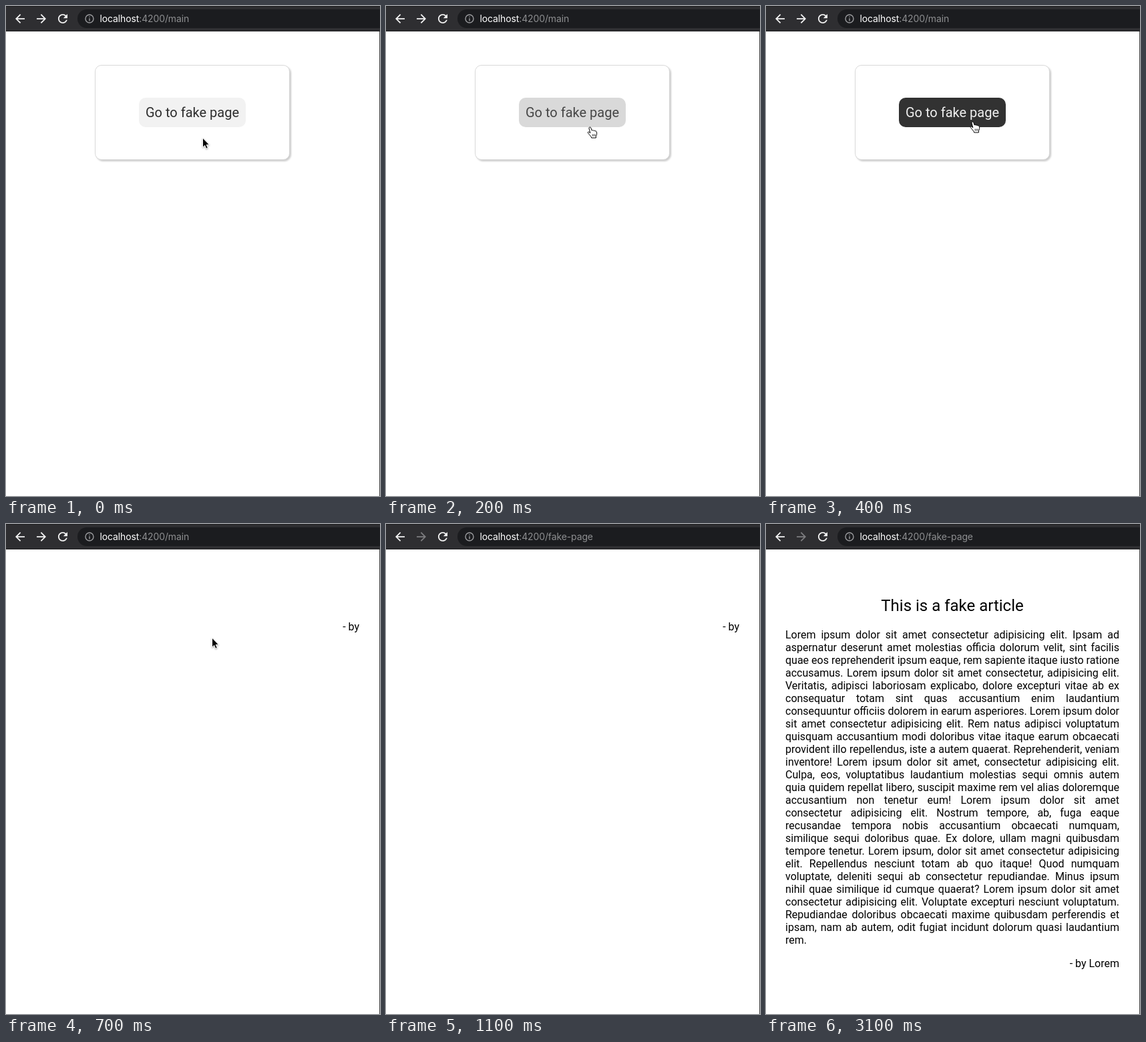
These frames come from a looping animation (560x732 px, 3400 ms). An HTML page:

```html
<!DOCTYPE html>
<html lang="en">
<head>
<meta charset="utf-8">
<title>Fake page</title>
<style>
  html, body { margin: 0; width: 100%; height: 100%; overflow: hidden; background: #fff; }
  body { position: relative; font: 16px/19px Roboto, sans-serif; color: #000; }
  svg { position: absolute; left: 0; top: 0; }
  article, #byline { position: absolute; left: 29px; width: 500px; }
  article { top: 108px; }
  h1 { margin: 0 0 20px; font-size: 24px; font-weight: 400; line-height: 28px; text-align: center; }
  p { margin: 0; white-space: pre-line; text-align: justify; text-align-last: justify; }
  #byline { text-align: right; }
  .url { font: 14px Inter, sans-serif; letter-spacing: -.12px; }
</style>
</head>
<body>
<article id="article"><h1>This is a fake article</h1><p>Lorem ipsum dolor sit amet consectetur adipisicing elit. Ipsam ad
aspernatur deserunt amet molestias officia dolorum velit, sint facilis
quae eos reprehenderit ipsum eaque, rem sapiente itaque iusto ratione
accusamus. Lorem ipsum dolor sit amet consectetur, adipisicing elit.
Veritatis, adipisci laboriosam explicabo, dolore excepturi vitae ab ex
consequatur totam sint quas accusantium enim laudantium
consequuntur officiis dolorem in earum asperiores. Lorem ipsum dolor
sit amet consectetur adipisicing elit. Rem natus adipisci voluptatum
quisquam accusantium modi doloribus vitae itaque earum obcaecati
provident illo repellendus, iste a autem quaerat. Reprehenderit, veniam
inventore! Lorem ipsum dolor sit amet, consectetur adipisicing elit.
Culpa, eos, voluptatibus laudantium molestias sequi omnis autem
quia quidem repellat libero, suscipit maxime rem vel alias doloremque
accusantium non tenetur eum! Lorem ipsum dolor sit amet
consectetur adipisicing elit. Nostrum tempore, ab, fuga eaque
recusandae tempora nobis accusantium obcaecati numquam,
similique sequi doloribus quae. Ex dolore, ullam magni quibusdam
tempore tenetur. Lorem ipsum, dolor sit amet consectetur adipisicing
elit. Repellendus nesciunt totam ab quo itaque! Quod numquam
voluptate, deleniti sequi ab consectetur repudiandae. Minus ipsum
nihil quae similique id cumque quaerat? Lorem ipsum dolor sit amet
consectetur adipisicing elit. Voluptate excepturi nesciunt voluptatum.
Repudiandae doloribus obcaecati maxime quibusdam perferendis et
ipsam, nam ab autem, odit fugiat incidunt dolorum quasi laudantium
rem.</p></article>
<div id="byline"></div>

<svg width="560" height="732" viewBox="0 0 560 732">
  <defs>
    <path id="back" d="M20 11H7.83l5.59-5.59L12 4l-8 8 8 8 1.41-1.41L7.83 13H20v-2z"/>
  </defs>

  <!-- browser toolbar -->
  <rect width="560" height="38" fill="#2e2e31"/>
  <path d="M0 .5H560M0 37.5H560" stroke="#1d1d1f"/>
  <path d="M559.5 38V732" stroke="#444"/>
  <rect x="107" y="5" width="480" height="28" rx="14" fill="#1b1c1f"/>
  <g fill="#f5f5f5">
    <use href="#back" transform="translate(21 19) scale(.875) translate(-12 -12)"/>
    <use id="forward" href="#back" transform="translate(53 19) scale(-.875 .875) translate(-12 -12)"/>
    <path transform="translate(85 19) scale(.875) translate(-12 -12)" d="M17.65 6.35C16.2 4.9 14.21 4 12 4c-4.42 0-8 3.58-8 8s3.58 8 8 8c3.73 0 6.84-2.55 7.73-6h-2.08c-.82 2.33-3.04 4-5.65 4-3.31 0-6-2.69-6-6s2.69-6 6-6c1.66 0 3.14.69 4.22 1.78L13 11h7V4z"/>
  </g>
  <g fill="none" stroke="#9a9b9e" stroke-width="1.4">
    <circle cx="125" cy="19" r="6"/>
    <path d="M125 15.4v1.4M125 18.2v4.2"/>
  </g>
  <text class="url" x="140.5" y="24" fill="#fff">localhost<tspan fill="#8d8e90">:4200/<tspan id="route"></tspan></tspan></text>

  <!-- main page -->
  <g id="card">
    <rect x="133.5" y="88.5" width="291" height="141" rx="9.5" fill="#fff" stroke="#d8d8d8" style="filter:drop-shadow(2px 2px 1px #0003)"/>
    <rect id="button" x="199" y="137" width="160" height="44" rx="10"/>
    <text id="label" x="279" y="166" font-size="20" text-anchor="middle">Go to fake page</text>
  </g>

  <!-- cursors -->
  <g fill="#000" stroke="#fff" style="filter:drop-shadow(0 1px 1px #0005)">
    <path id="arrow" d="M0 0V14.2L3.2 11.2L5.3 16.2L7.8 15.1L5.7 10.3H10Z"/>
  </g>
  <g id="hand" fill="#fff" stroke="#000" stroke-linejoin="round">
    <path d="M3.6 1.2C4.6 .6 5.4 1 5.8 2L7.2 6C7.6 5.2 9.2 5.2 9.6 6.3C10.2 5.6 11.7 5.8 12 7C13 6.4 14.2 7 14.4 8.2C15 11 14.6 12.5 13.4 14.5V17H6.6L6.2 15.5C4.5 13.8 3.4 11.5 1.4 9.6C.6 8.4 2 7.5 3.2 8.4L4.8 9.8L3 3C2.8 2 3 1.5 3.6 1.2Z"/>
    <path d="M8.2 11.5v3M10.2 11.5v3M12.2 11.5v3" stroke-width=".8"/>
  </g>
</svg>

<script>
const LOOP = 3400;
const $ = id => document.getElementById(id);
const show = (id, on) => $(id).style.display = on ? '' : 'none';
const gray = (from, to, k) => {
  const v = Math.round(from + (to - from) * k);
  return `rgb(${v},${v},${v})`;
};

// start time, cursor, x, y, button hover amount
const steps = [
  [0, 'arrow', 294.5, 197, 0],
  [100, 'arrow', 302, 186, 0],
  [200, 'hand', 301, 180, .13],
  [300, 'hand', 304, 175, .78],
  [400, 'hand', 305, 172, 1],
  [700, 'arrow', 308.5, 170, 0],
  [1000, 'arrow', 535, 250, 0],
  [1100, 'none', 0, 0, 0],
];

function draw(now) {
  const t = now % LOOP;
  const [, cursor, x, y, hover] = steps.findLast(s => s[0] <= t);
  for (const id of ['arrow', 'hand']) {
    show(id, id === cursor);
    $(id).setAttribute('transform', `translate(${x} ${y})`);
  }

  show('card', t < 700);
  $('button').setAttribute('fill', gray(242, 50, hover));
  $('label').setAttribute('fill', gray(45, 240, hover));

  const routed = t >= 800, loaded = t >= 2700;
  $('route').textContent = routed ? 'fake-page' : 'main';
  $('forward').setAttribute('fill', routed ? '#7d7d80' : '#f5f5f5');

  show('article', loaded);
  show('byline', t >= 700);
  $('byline').style.top = loaded ? '647px' : '144px';
  $('byline').textContent = loaded ? '- by Lorem' : '- by';
}

function tick() {
  draw(performance.now());
  requestAnimationFrame(tick);
}
tick();
</script>
</body>
</html>
```
